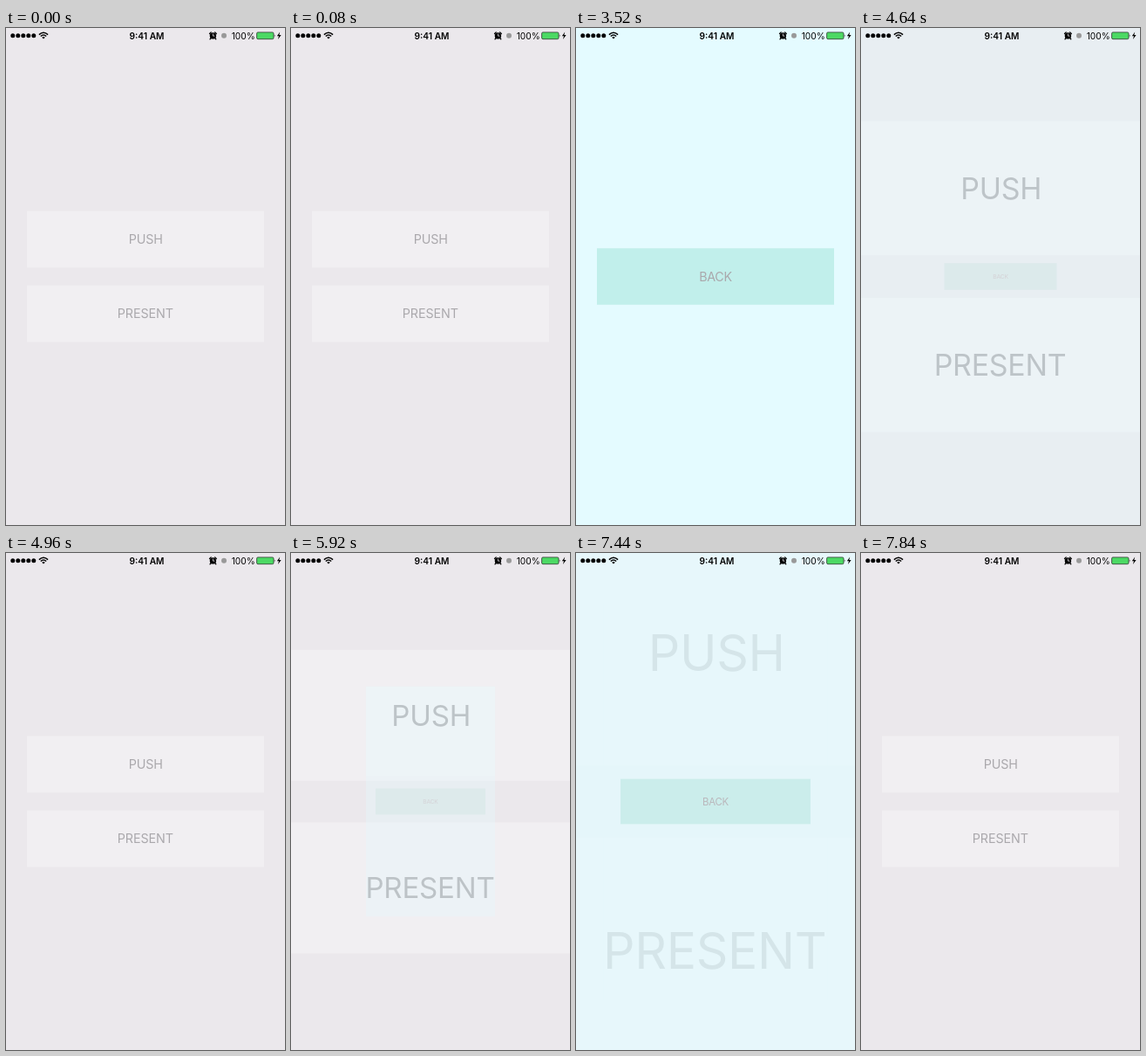
Recreate the animation shown at these times as an HTML page. Size 320 by 569 pixels, loop 8800 ms.

```html
<!DOCTYPE html>
<html lang="en">
<head>
<meta charset="utf-8">
<title>Zoom transition</title>
<style>
  html, body { margin: 0; width: 100%; height: 100%; overflow: hidden; background: #e4fbff; }
  svg { display: block; width: 100%; height: 100%; }
  text { font-family: Inter, "Liberation Sans", sans-serif; text-anchor: middle; }
  .label { font-size: 14.3px; letter-spacing: -.1px; fill: #aaa8ac; }
  .status { font-size: 10.2px; }
</style>
</head>
<body>
<svg viewBox="0 0 320 569" preserveAspectRatio="none">
  <rect width="320" height="569" fill="#e4fbff"/>
  <g id="views">
    <g id="detail">
      <rect width="320" height="569" fill="#e4fbff"/>
      <rect x="24" y="252.2" width="272" height="64.6" fill="#c1efeb"/>
      <text class="label" x="160" y="289.8" style="letter-spacing:-.35px">BACK</text>
    </g>
    <g id="home">
      <rect width="320" height="569" fill="#ebe8ec"/>
      <g fill="#f1eff2">
        <rect x="24" y="209.5" width="272" height="64.8"/>
        <rect x="24" y="294.8" width="272" height="64.8"/>
      </g>
      <text class="label" x="160.3" y="247.2">PUSH</text>
      <text class="label" x="159.8" y="332.4">PRESENT</text>
    </g>
  </g>
  <g id="statusBar">
    <path d="M7.8 8.8h24.1" stroke="#000" stroke-width="5" stroke-linecap="round" stroke-dasharray="0 6"/>
    <g fill="none" stroke="#000" stroke-width="1.5">
      <path d="M37.9 7.6Q43 2.9 48.1 7.6M39.8 9.5Q43 6.6 46.2 9.5"/>
    </g>
    <path d="M41.2 10.7Q43 9.3 44.8 10.7L43 12.5z"/>
    <text class="status" x="161.5" y="12.5" font-weight="600">9:41 AM</text>
    <circle cx="237.4" cy="8.9" r="3.7"/>
    <path d="M233.5 6.5L235.2 4.9M239.6 4.9L241.3 6.5M234.9 11.7L234 12.8M239.9 11.7L240.8 12.8" stroke="#000" stroke-width="1.3" stroke-linecap="round"/>
    <path d="M237.4 6.5V9.1H239.4" fill="none" stroke="#ebe8ec" stroke-width=".8"/>
    <circle cx="250" cy="8.7" r="3" fill="#999"/>
    <text class="status" x="272.2" y="12.5">100%</text>
    <rect x="287.6" y="4.9" width="19.4" height="7.8" rx="1.4" fill="#4cd964" stroke="#222" stroke-width=".7"/>
    <path d="M307.8 7.2Q309.2 8.8 307.8 10.4z"/>
    <path d="M314.2 4.6L310.8 9.2H313L311.9 12.9L315.6 8H313.3z"/>
  </g>
</svg>
<script>
  const LOOP = 8800, STEP = 80, DURATION = 450;
  const MAX_ZOOM = 5, MIN_ZOOM = 0.2;
  const moves = [
    { at: 2811, push: true },
    { at: 4505, push: false },
    { at: 5864, push: true },
    { at: 7399, push: false }
  ];
  const views = document.getElementById('views');
  const home = document.getElementById('home');
  const detail = document.getElementById('detail');

  const easeOut = x => 1 - (1 - Math.min(1, x)) ** 3;
  const mix = (a, b, p) => a + (b - a) * p;

  function place(view, zoom, opacity) {
    view.setAttribute('transform', `translate(160 284.5) scale(${zoom}) translate(-160 -284.5)`);
    view.setAttribute('opacity', opacity);
  }

  function render(ms) {
    const t = Math.floor(ms % LOOP / STEP) * STEP;
    const move = moves.filter(m => m.at <= t).pop();
    const p = move ? easeOut((t - move.at) / DURATION) : 1;
    const push = Boolean(move && move.push);
    const depth = push ? p : 1 - p; // 0 = home, 1 = detail

    // The incoming view lies on top and fades in
    const top = push ? detail : home;
    if (views.lastElementChild !== top) views.append(top);
    place(home, mix(1, MAX_ZOOM, depth), push ? 1 : p);
    place(detail, mix(MIN_ZOOM, 1, depth), push ? p : 1);
  }

  const start = performance.now();
  function tick() {
    render(performance.now() - start);
    requestAnimationFrame(tick);
  }
  tick();
</script>
</body>
</html>
```
